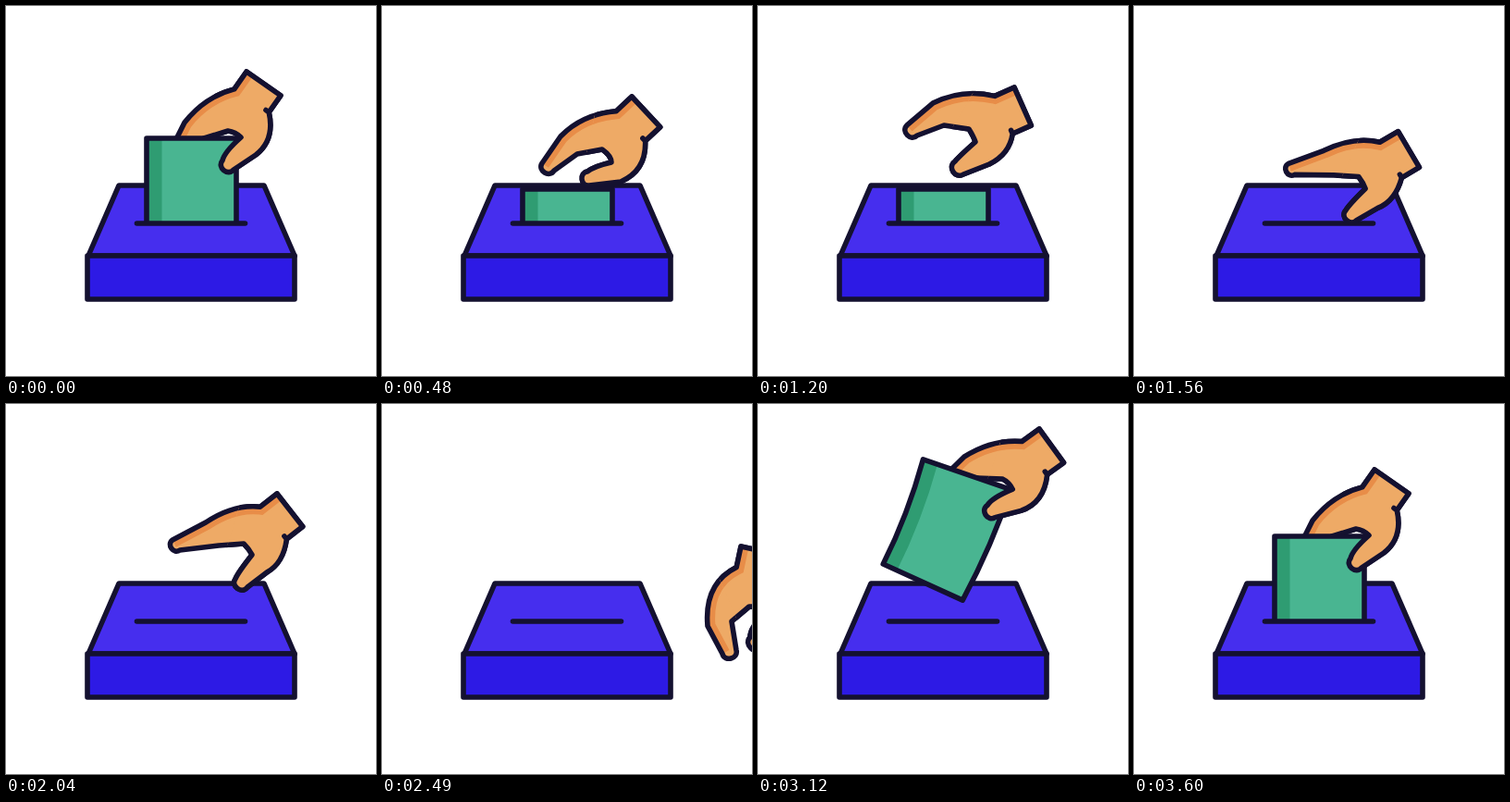
An HTML page that plays this animation: 400x400 px, repeating every 5630 ms.

```html
<!DOCTYPE html>
<html lang="en">
<head>
<meta charset="utf-8">
<title>Casting a vote</title>
<style>
  html, body { margin: 0; width: 100%; height: 100%; overflow: hidden; background: #fff; }
  svg { display: block; width: 100%; height: 100%; }
  .line { stroke: #141130; stroke-width: 5.6; stroke-linejoin: round; stroke-linecap: round; }
</style>
</head>
<body>
<svg viewBox="0 0 400 400">
  <defs>
    <clipPath id="aboveSlot"><rect width="400" height="235"/></clipPath>
    <clipPath id="handClip"><path id="handShape"/></clipPath>
    <clipPath id="thumbSide"><rect x="-35" y="-30" width="140" height="200" transform="rotate(-35)"/></clipPath>
    <clipPath id="ballotClip"><path id="ballotShape"/></clipPath>
    <g id="hand">
      <path id="skin" fill="#eeaa66"/>
      <path id="shade" fill="none" stroke="#e88d48" stroke-width="17" clip-path="url(#handClip)"/>
      <path id="outline" class="line" fill="none"/>
    </g>
  </defs>
  <path class="line" fill="#462eee" d="M122 194H279L312 270H89Z"/>
  <path class="line" fill="#2d1ae5" d="M88 270H312V317H88Z"/>
  <g id="back"><use href="#hand"/></g>
  <g clip-path="url(#aboveSlot)">
    <g id="ballot">
      <path id="paper" fill="#49b591"/>
      <path id="stripe" fill="none" stroke="#2f9c72" stroke-width="33" clip-path="url(#ballotClip)"/>
      <path id="edge" class="line" fill="none"/>
    </g>
  </g>
  <path class="line" d="M141.5 235H258.5"/>
  <g id="front"><g clip-path="url(#thumbSide)"><use href="#hand"/></g></g>
</svg>
<script>
const LOOP = 5630, STEP = 30, REST = 3600;
const $ = id => document.getElementById(id);
const set = (id, name, value) => $(id).setAttribute(name, value);
const mix = (a, b, u) => a + (b - a) * u;
const clamp = u => Math.max(0, Math.min(1, u));
const smooth = u => { u = clamp(u); return u * u * (3 - 2 * u); };

// Rewrites a drawn pose relative to the wrist corner (ax, ay) and wrist angle.
function pose(ax, ay, angle, xy) {
  const r = angle * Math.PI / 180, c = Math.cos(r), s = Math.sin(r), out = [];
  for (let i = 0; i < xy.length; i += 2) {
    const x = xy[i] - ax, y = xy[i + 1] - ay;
    out.push([x * c + y * s, y * c - x * s]);
  }
  return out;
}

// Point order: palm bend, palm, thumb tip (2), thumb bend, web, web bend,
// finger root, finger underside, finger tip (2), knuckle, back bend.
const grip = pose(260, 71, 35, [291,145, 270,161, 246,177, 234,167, 236,158, 254,142, 248,136,
  240,135, 214,143, 192,168, 176,160, 193,126, 215,98]);
const open = pose(270, 98, 47, [286,178, 258,190, 224,194, 222,179, 230,173, 248,169, 248,162,
  238,155, 211,160, 186,178, 173,170, 193,141, 216,117]);
const wide = pose(277, 88, 66, [272,160, 250,171, 222,182, 213,168, 218,162, 235,147, 233,141,
  228,133, 201,129, 172,140, 161,129, 189,105, 221,89]);
const flat = pose(293, 97, 52, [300,172, 282,182, 261,198, 248,189, 251,182, 266,163, 263,157,
  257,151, 230,153, 188,158, 180,147, 216,128, 246,108]);
const hang = pose(388, 154, 12, [448,222, 432,245, 410,264, 398,252, 398,240, 416,226, 408,219,
  397,219, 378,235, 383,266, 368,270, 352,240, 348,194]);

// time, wrist x, wrist y, wrist angle, pose
const keys = [
  [0, 260, 71, 35, grip],
  [270, 260, 126, 35, grip],
  [480, 270, 98, 47, open],
  [840, 276, 77, 62, wide],
  [1200, 277, 88, 66, wide],
  [1530, 285, 136, 60, flat],
  [2040, 293, 97, 52, flat],
  [2280, 322, 106, 40, flat],
  [2490, 388, 154, 12, hang],
  [2580, 470, 190, -5, hang],
  [2700, 440, -190, 75, grip],
  [2880, 332, -25, 65, grip],
  [3120, 304, 27, 54, grip],
  [3450, 265, 63, 38, grip],
  [REST, 260, 71, 35, grip]
];

// Slope at a key: flat at turning points, harmonic mean elsewhere.
function slope(i, ch) {
  if (i === 0 || i === keys.length - 1) return 0;
  const rate = k => (keys[k + 1][ch] - keys[k][ch]) / (keys[k + 1][0] - keys[k][0]);
  const a = rate(i - 1), b = rate(i);
  return a * b <= 0 ? 0 : 2 * a * b / (a + b);
}

function curve(i, ch, u) {
  const p = keys[i][ch], q = keys[i + 1][ch], h = keys[i + 1][0] - keys[i][0];
  const v = 1 - u;
  return p * (1 + 2 * u) * v * v + q * u * u * (3 - 2 * u)
    + h * u * v * (slope(i, ch) * v - slope(i + 1, ch) * u);
}

const pt = p => p[0].toFixed(2) + ' ' + p[1].toFixed(2) + ' ';

// Rounded tip between two points, bulging outwards.
function cap(a, b) {
  const nx = (b[1] - a[1]) * 0.62, ny = (a[0] - b[0]) * 0.62;
  return 'C' + pt([a[0] + nx, a[1] + ny]) + pt([b[0] + nx, b[1] + ny]) + pt(b);
}

function drawHand(p, x, y, angle) {
  const body = 'M0 0L45 0L45 22Q' + pt(p[0]) + pt(p[1]) + 'L' + pt(p[2]) + cap(p[2], p[3])
    + 'Q' + pt(p[4]) + pt(p[5]) + 'Q' + pt(p[6]) + pt(p[7]) + 'L' + pt(p[8]) + 'L' + pt(p[9])
    + cap(p[9], p[10]) + 'L' + pt(p[11]) + 'Q' + pt(p[12]) + '0 23Z';
  set('skin', 'd', body);
  set('handShape', 'd', body);
  set('outline', 'd', body + 'M45 22l-4 0');
  set('shade', 'd', 'M0 0L0 23Q' + pt(p[12]) + pt(p[11]) + 'L' + pt(p[10]));
  const place = `translate(${x} ${y}) rotate(${angle})`;
  set('back', 'transform', place);
  set('front', 'transform', place);
}

function drawBallot(t, x, y, angle) {
  const held = t >= 2700;
  $('ballot').style.display = held || t < 1530 ? '' : 'none';
  const tilt = held ? angle - 35 : 0, bend = clamp(tilt / 19);
  const left = `Q${4 * bend} 62 ${-4 * bend} 121`;
  const shape = `M0 0${left}L${97 - 7 * bend} ${121 + 9 * bend}Q${97 + 4 * bend} 62 ${97 + 3 * bend} 0Z`;
  set('paper', 'd', shape);
  set('ballotShape', 'd', shape);
  set('edge', 'd', shape);
  set('stripe', 'd', 'M0 0' + left);
  if (held) {
    set('ballot', 'transform', `translate(${x} ${y}) rotate(${tilt}) translate(-108 72)`);
  } else {
    const top = t < 270 ? y + 72 : mix(198, 240, smooth((t - 1300) / 230));
    set('ballot', 'transform', `translate(152 ${top})`);
  }
}

function draw(t) {
  let i = 0;
  while (i < keys.length - 2 && t >= keys[i + 1][0]) i++;
  const a = keys[i], b = keys[i + 1], u = clamp((t - a[0]) / (b[0] - a[0]));
  const [x, y, angle] = [1, 2, 3].map(ch => curve(i, ch, u));
  const s = smooth(u);
  const points = a[4].map((p, k) => [mix(p[0], b[4][k][0], s), mix(p[1], b[4][k][1], s)]);
  drawHand(points, x, y, angle);
  drawBallot(t, x, y, angle);
}

function frame() {
  const t = performance.now() % LOOP;
  draw(Math.min(REST, Math.floor(t / STEP) * STEP));
  requestAnimationFrame(frame);
}
frame();
</script>
</body>
</html>
```
